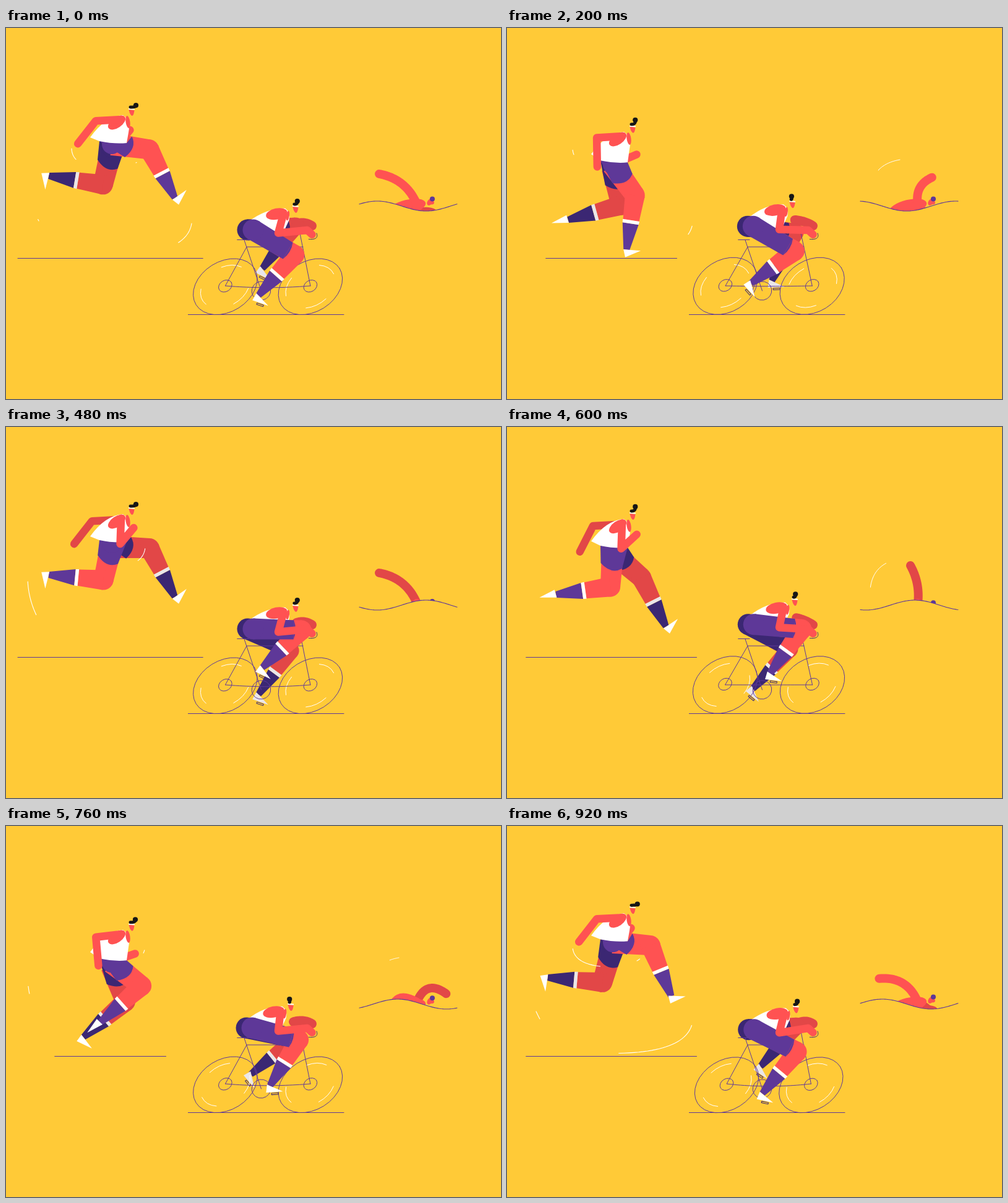
Animation, 800 px wide and 600 px high, one loop 960 ms. Source, as an HTML page with a canvas:

```html
<!DOCTYPE html>
<html lang="en">
<head>
<meta charset="utf-8">
<title>Triathlon</title>
<style>
html, body { margin: 0; width: 100%; height: 100%; overflow: hidden; background: #ffca37; }
canvas { display: block; width: 800px; height: 600px; }
</style>
</head>
<body>
<canvas id="stage" width="800" height="600"></canvas>
<script>
const ctx = document.getElementById('stage').getContext('2d');
const LOOP = 960, HALF = 480, STEP = 40, TAU = Math.PI * 2, DEG = TAU / 360;
const YELLOW = '#ffca37', RED = '#ff5252', DARK_RED = '#e24747', PURPLE = '#5e3898',
  DARK_PURPLE = '#3b2773', WHITE = '#ffffff', GREY = '#eae6ea', BLACK = '#161616';
const NEAR = { skin: RED, cloth: PURPLE, trim: WHITE, shoe: WHITE };
const FAR = { skin: DARK_RED, cloth: DARK_PURPLE, trim: GREY, shoe: WHITE };

/* Timing and geometry */
const mod = (a, n) => ((a % n) + n) % n;
const clamp = (v, lo, hi) => Math.max(lo, Math.min(hi, v));
const ramp = (t, a, b) => clamp((t - a) / (b - a), 0, 1);
const lerp = (a, b, k) => a + (b - a) * k;
const mix = (p, q, k) => [lerp(p[0], q[0], k), lerp(p[1], q[1], k)];
const polar = ([x, y], r, deg) => [x + r * Math.cos(deg * DEG), y + r * Math.sin(deg * DEG)];
const wave = (t, peak, period) => Math.cos(TAU * (t - peak) / period);
const heading = (p, q) => Math.atan2(q[1] - p[1], q[0] - p[0]) / DEG;

// Closed Catmull-Rom path through evenly timed points.
function travel(points, t) {
  const n = points.length, s = mod(t, LOOP) / LOOP * n, i = Math.floor(s), k = s - i;
  const [a, b, c, d] = [-1, 0, 1, 2].map(j => points[mod(i + j, n)]);
  return b.map((v, j) => v + k / 2 * (c[j] - a[j] +
    k * (2 * a[j] - 5 * v + 4 * c[j] - d[j] + k * (3 * (v - c[j]) + d[j] - a[j]))));
}

// Knee of a two-bone leg, bending forwards.
function bendKnee(hip, ankle, thigh, shin) {
  const d = Math.hypot(ankle[0] - hip[0], ankle[1] - hip[1]);
  const cos = (thigh * thigh + d * d - shin * shin) / (2 * thigh * d);
  return polar(hip, thigh, heading(hip, ankle) - Math.acos(clamp(cos, -1, 1)) / DEG);
}

// Points on both sides of p, across the direction a-b; the front one first.
function sides(p, a, b, r) {
  const angle = heading(a, b);
  return [polar(p, r, angle - 90), polar(p, r, angle + 90)];
}

/* Drawing helpers */
function trace(points) {
  ctx.beginPath();
  points.forEach(p => ctx.lineTo(p[0], p[1]));
}

function fill(color, points) {
  ctx.fillStyle = color;
  trace(points);
  ctx.fill();
}

function stroke(color, width, points) {
  ctx.strokeStyle = color;
  ctx.lineWidth = width;
  trace(points);
  ctx.stroke();
}

function ellipse(color, x, y, rx, ry = rx, rot = 0) {
  ctx.fillStyle = color;
  ctx.beginPath();
  ctx.ellipse(x, y, rx, ry, rot, 0, TAU);
  ctx.fill();
}

function curve(color, width, a, c, b, from = 0, to = 1) {
  if (to - from < 0.01) return;
  const points = [];
  for (let i = 0; i <= 24; i++) {
    const k = lerp(from, to, i / 24);
    points.push(mix(mix(a, c, k), mix(c, b, k), k));
  }
  stroke(color, width, points);
}

function taper(color, p, q, r1, r2) {
  const [a, b] = sides(p, p, q, r1), [c, d] = sides(q, p, q, r2);
  fill(color, [a, c, d, b]);
}

function shoe(color, knee, ankle, angle) {
  const flex = mod(heading(knee, ankle) - angle + 180, 360) - 180;
  const back = polar(ankle, -5, angle + 74 * ramp(flex, 75, -10));
  const toe = polar(back, 28, angle), heel = polar(back, 13, angle + 73);
  fill(color, [back, toe, heel]);
  return [toe, heel];
}

function leg(look, hip, knee, ankle, angle, hipR, kneeR) {
  const top = mix(knee, ankle, 0.46), low = mix(knee, ankle, 0.52), r = kneeR * 0.82;
  taper(look.skin, hip, knee, hipR, kneeR);
  ellipse(look.skin, knee[0], knee[1], kneeR);
  taper(look.skin, knee, top, kneeR, r);
  taper(look.cloth, low, ankle, r, 5);
  taper(look.trim, top, low, r + 0.5, r);
  return shoe(look.shoe, knee, ankle, angle);
}

function head(x, y, bunX, bunY) {
  ctx.fillStyle = RED;
  ctx.beginPath();
  ctx.moveTo(x - 4.5, y - 4);
  ctx.lineTo(x + 4.5, y - 3);
  ctx.quadraticCurveTo(x + 3.5, y + 6, x + 0.5, y + 6);
  ctx.quadraticCurveTo(x - 3, y + 4, x - 4.5, y - 4);
  ctx.fill();
  stroke(WHITE, 2, [[x - 4, y - 5], [x + 4, y - 4.5]]);
  curve(BLACK, 5, [x - 2, y - 8], [bunX + 1, y - 8], [bunX, bunY]);
  ellipse(BLACK, bunX, bunY, 4.1);
}

/* Runner */
// ankle x, ankle y, foot angle
const FOOT_PATH = [
  [273, 275, -35], [257, 323, -34], [158, 362, 28], [71, 278, 97],
  [69, 239, 104], [79, 271, 180], [118, 322, 168], [230, 292, 100]
];
const THIGH = 61, SHIN = 89;

function runnerLeg(look, t, hip, waist) {
  const [x, y, angle] = travel(FOOT_PATH, t), ankle = [x, y];
  const knee = bendKnee(hip, ankle, THIGH, SHIN);
  leg(look, hip, knee, ankle, angle, 18, 16);
  const [front] = sides(mix(hip, knee, 0.5), hip, knee, 17);
  const [, back] = sides(mix(hip, knee, 0.39), hip, knee, 18);
  ctx.fillStyle = look.cloth;
  trace([...waist, front]);
  ctx.quadraticCurveTo(...mix(hip, knee, 0.68), ...back);
  ctx.fill();
  ellipse(look.cloth, hip[0], hip[1], 16);
}

function runnerArm(color, t, shoulder, dip) {
  const forward = 0.5 - 0.5 * Math.tanh(8 * wave(t, 10, LOOP));
  const elbow = polar(shoulder, 41, lerp(177, 92, forward));
  const hand = polar(elbow, lerp(47, 34, forward), lerp(128 - 44 * dip, 30 * dip - 50, forward));
  stroke(color, 12.5, [shoulder, elbow, hand]);
}

// Start and end of a swoosh: it runs out along its path, then is pulled back.
function trail(t) {
  const u = mod(t - 120, LOOP) + 120;
  return u < 600 ? [ramp(u, 190, 450), ramp(u, 165, 370)]
    : [1 - ramp(u, 840, 925), 1 - ramp(u, 910, 985)];
}

function runner(t) {
  const dip = ((1 - wave(t, 0, HALF)) / 2) ** 2;
  const ground = 122 + 32 * wave(t, 40, HALF);
  const nx = 189, ny = 141 + 31 * dip, waistY = 183 + 36 * dip;
  const hip = [171, 188 + 38 * dip];
  const waist = [[151, waistY], [195, waistY + 3]];
  stroke(PURPLE, 1, [[168.5 - ground, 372.5], [168.5 + ground, 372.5]]);

  const farIsBack = t > 240 && t < 720;
  runnerArm(farIsBack ? DARK_RED : RED, t + HALF, [nx - 9, ny + 9], dip);
  runnerLeg(FAR, t + HALF, [hip[0], hip[1] + 6], waist);
  runnerLeg(NEAR, t, hip, waist);

  ctx.fillStyle = WHITE;
  ctx.beginPath();
  ctx.moveTo(nx, ny);
  ctx.quadraticCurveTo(nx + 13, ny + 8, nx + 9, ny + 28);
  ctx.lineTo(...waist[1]);
  ctx.quadraticCurveTo(nx - 14, waistY + 5, ...waist[0]);
  ctx.lineTo(nx - 53, ny + 36);
  ctx.quadraticCurveTo(nx - 29, ny + 2, nx, ny);
  ctx.fill();
  ellipse(RED, nx + 8, ny + 11, 3.5, 10, -0.15);
  ellipse(RED, nx - 10, ny + 12, 16, 8.5, -0.6);
  runnerArm(RED, t, [nx - 3, ny + 7], dip);
  const headY = 136 + 32 * dip, bounce = wave(t, 160, HALF);
  head(203, headY, 209 - 2 * bounce, headY - 12.5 - 3 * bounce);

  const lead = trail(t), rear = trail(t + HALF - STEP);
  curve(WHITE, 1.1, [106, 195], [107, 226], [165, 228], ...lead);
  curve(WHITE, 1.1, [300, 316], [291, 373], [144, 367], ...lead);
  curve(WHITE, 1.1, [225, 195], [223, 211], [210, 218], ...rear);
  curve(WHITE, 1.1, [35, 246], [36, 281], [53, 312], ...rear);
}

/* Cyclist */
const CRANK = [411, 411];

function ring(color, x, y, rx, ry, from = 0, to = TAU) {
  ctx.strokeStyle = color;
  ctx.lineWidth = 1;
  ctx.beginPath();
  ctx.ellipse(x, y, rx, ry, -32 * DEG, from, to);
  ctx.stroke();
}

function wheel(x, y, bob, angle) {
  ring(PURPLE, x, y, 55.6, 41 + bob * 1.3);
  ring(PURPLE, x, y - 1, 11.5, 9);
  for (let i = 0; i < 3; i++) {
    const mid = (angle + i * 120) * DEG;
    ring(WHITE, x, y, 43, 31, mid - 0.43, mid + 0.43);
  }
}

function bike(t, bob) {
  const rear = [354 - 1.5 * bob, 417], front = [492.3 + 1.3 * bob, 417], y = 418 - 1.1 * bob;
  const turn = 70 + 360 * t / HALF;
  wheel(rear[0], y, bob, turn);
  wheel(front[0], y, bob, turn + 30);
  curve(PURPLE, 1, rear, [423, 421.5 - 4.5 * bob], front);
  stroke(PURPLE, 1, [rear, [389, 354], [480, 354]]);
  stroke(PURPLE, 1, [[373.5, 342.5], [392, 342.5]]);
  stroke(PURPLE, 1, [[385, 343], [412.5, 425]]);
  stroke(PURPLE, 1, [[475, 332], front]);
  ring(PURPLE, 412.5, 425, 15.5, 15);
}

function pedal(heel, toe) {
  ctx.save();
  ctx.translate(...mix(heel, toe, 0.5));
  ctx.rotate(heading(heel, toe) * DEG);
  ctx.strokeStyle = DARK_PURPLE;
  ctx.lineWidth = 1;
  ctx.strokeRect(-5, 1.5, 11, 2.5);
  ctx.restore();
}

function riderLeg(look, t, hip, size) {
  const turn = (100 + 360 * t / LOOP) * DEG;
  const ankle = [CRANK[0] + 17 * Math.cos(turn), CRANK[1] + 22 * Math.sin(turn)];
  const knee = bendKnee(hip, ankle, 78, 88);
  const [toe, heel] = leg(look, hip, knee, ankle, 50 + 27 * wave(t, 260, LOOP), 15, 16 * size);
  const hem = mix(hip, knee, 0.84);
  const [front, back] = sides(hem, hip, knee, 15.5 * size);
  taper(look.cloth, hip, hem, 17, 15.5 * size);
  trace([front]);
  ctx.quadraticCurveTo(...mix(hip, knee, 0.92), ...back);
  ctx.fill();
  ellipse(look.cloth, hip[0], hip[1], 17);
  pedal(heel, toe);
}

function cyclist(t) {
  const bob = wave(t, 140, HALF), sway = wave(t, 20, HALF);
  const hx = 398.5 + sway, hy = 325 - 6 * bob;
  const sx = 435 + 2.5 * sway, sy = 299 - 6.5 * bob;
  stroke(PURPLE, 1, [[294, 463.5], [546, 463.5]]);
  curve(DARK_RED, 15, [sx + 32, sy + 16], [482, 312], [494.5, 320]);
  riderLeg({ ...FAR, shoe: GREY }, t + HALF, [hx - 9, hy], 0.85);
  bike(t, bob);

  ctx.fillStyle = WHITE;
  ctx.beginPath();
  ctx.moveTo(hx - 7, hy - 14);
  ctx.quadraticCurveTo(sx - 15, sy - 10, sx + 14, sy - 9);
  ctx.quadraticCurveTo(sx + 23, sy - 3, sx + 20, sy + 10);
  ctx.lineTo(sx + 10, sy + 32);
  ctx.lineTo(hx, hy + 5);
  ctx.fill();
  riderLeg(NEAR, t, [hx, hy], 1);
  ellipse(RED, sx, sy, 17.5, 9, -0.2);
  ellipse(RED, sx + 18, sy + 3, 2.5, 8, 0.15);
  stroke(RED, 12.5, [[sx + 11, sy], [440, 330 - 6 * bob], [487, 327], [494.5, 334]]);
  curve(DARK_PURPLE, 1, [489, 341.5], [506, 343], [502, 332]);
  const headX = 464 + 4 * sway, headY = 291 - 8 * bob;
  head(headX, headY, headX + 0.5 + 2.5 * sway, headY - 13);
}

/* Swimmer */
// hand x, hand y, bend of the arm
const HAND_PATH = [
  [603, 236, 0.27], [652, 224, 0.16], [701, 255, -0.6], [720, 305, -0.5],
  [690, 330, 0], [640, 330, 0], [628, 320, 0.8], [612, 275, 0.6]
];

function swimArm(color, t) {
  const [hx, hy, bend] = travel(HAND_PATH, t), sx = 664, sy = 285;
  const elbow = [(hx + sx) / 2 - (hy - sy) * bend, (hy + sy) / 2 + (hx - sx) * bend];
  curve(color, 14, [hx, hy], elbow, [sx, sy]);
}

function swimmer(t) {
  const trough = 679 - 158 * t / LOOP, water = [];
  for (let x = 571; x <= 729; x += 2) water.push([x, 288 + 8 * wave(x, trough, 158)]);
  const sink = ((1 + wave(t, 575, LOOP)) / 2) ** 4;
  const bodyY = 288 + 17 * sink, x = 685, y = 280.5 + 8 * sink;
  ctx.save();
  trace([[571, 180], ...water, [729, 180]]);
  ctx.clip();
  swimArm(DARK_RED, t + HALF);
  ellipse(DARK_RED, 682, bodyY + 6, 13, 4, 0.1);
  ellipse(RED, 648, bodyY + 2, 31, 12, -0.24);
  ellipse(RED, 664, bodyY - 1, 9, 10, -0.3);
  swimArm(RED, t);
  ellipse(RED, x, y + 1, 4, 6, 0.55);
  ellipse(RED, x + 3, y + 2, 4, 3);
  ellipse(PURPLE, x + 4, y - 4, 4);
  ctx.restore();
  stroke(PURPLE, 1.1, water);
  const p = mod(t, HALF);
  curve(WHITE, 1, [587, 278], [583, 222], [635, 213], ramp(p, 100, 330) ** 0.7, ramp(p, 60, 140));
}

function draw(now) {
  const t = Math.floor(mod(now, LOOP) / STEP) * STEP;
  ctx.fillStyle = YELLOW;
  ctx.fillRect(0, 0, 800, 600);
  ctx.lineCap = ctx.lineJoin = 'round';
  runner(t);
  cyclist(t);
  swimmer(t);
}

let start;
function tick(now) {
  if (start === undefined) start = now;
  draw(now - start);
  requestAnimationFrame(tick);
}
draw(0);
requestAnimationFrame(tick);
</script>
</body>
</html>
```
